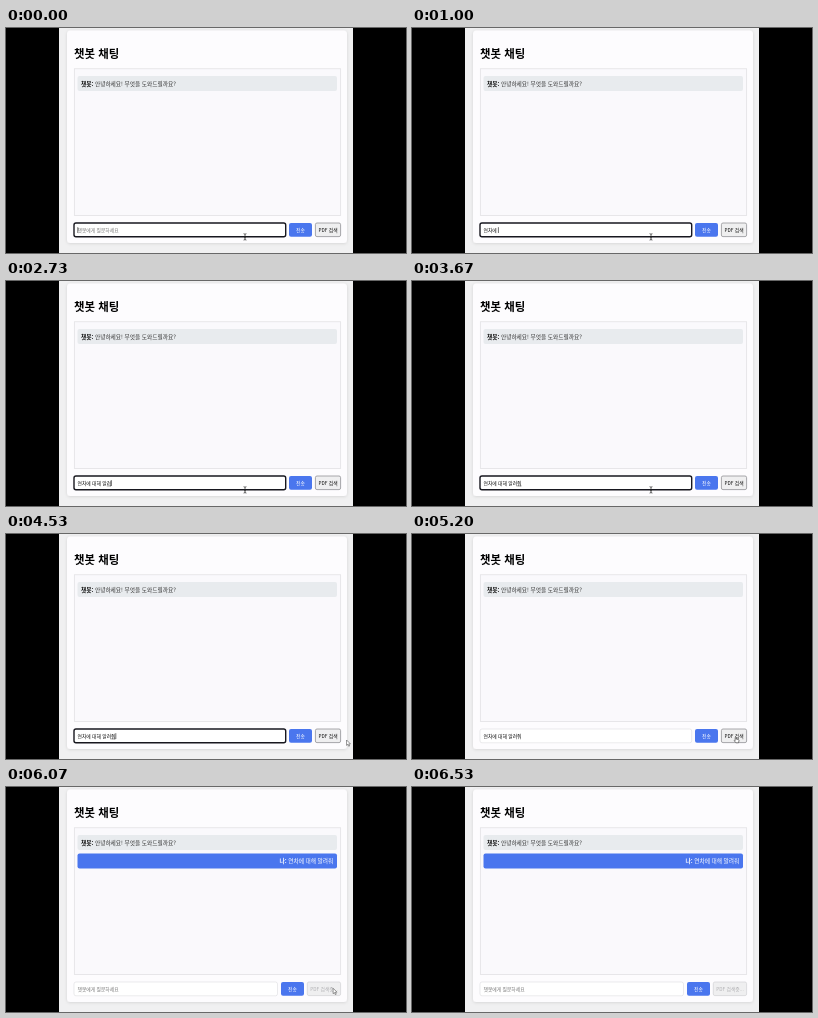
Animation of 400x225 px, one loop 8 s. Source, as an HTML page:

```html
<!DOCTYPE html>
<html lang="ko">
<head>
<meta charset="utf-8">
<style>
html, body { margin: 0; height: 100%; overflow: hidden; background: #000; }
svg { display: block; width: 100vw; height: 100vh; }
text { font: 4.8px "Noto Sans CJK KR", "Noto Sans CJK JP", "Noto Sans CJK", sans-serif; white-space: pre; }
.msg { font-size: 5.7px; }
.bold { font-weight: 700; }
</style>
</head>
<body>
<svg viewBox="0 0 400 225">
  <defs>
    <clipPath id="page"><path d="M53 0H347V225H53Z"/></clipPath>
    <filter id="shadow"><feDropShadow dx="0" dy=".6" stdDeviation="1.5" flood-opacity=".13"/></filter>
  </defs>
  <g clip-path="url(#page)">
    <path d="M53 0H347V225H53Z" fill="#f0f0f1"/>
    <rect x="61" y="2.5" width="280" height="212.5" rx="3.5" fill="#fdfcfe" filter="url(#shadow)"/>
    <text x="68" y="30" class="bold" style="font-size:11.4px">챗봇 채팅</text>
    <rect x="68.3" y="40.8" width="266.4" height="146.7" fill="#faf9fc" stroke="#dedee1" stroke-width=".7"/>
    <rect x="71.5" y="48" width="259.5" height="15" rx="2" fill="#e8ebee"/>
    <text x="75" y="57.7" class="msg" fill="#333"><tspan class="bold" fill="#111">챗봇:</tspan> 안녕하세요! 무엇을 도와드릴까요?</text>
    <g id="reply">
      <rect x="71.5" y="66.5" width="259.5" height="15" rx="2" fill="#4a76ee"/>
      <text x="327.3" y="76.2" class="msg" fill="#fff" text-anchor="end"><tspan class="bold">나:</tspan> 연차에 대해 알려줘</text>
    </g>

    <rect id="box" y="195" height="13.8" rx="2" fill="#fff"/>
    <text id="input" x="71.5" y="203.7"></text>
    <path id="under" stroke="#222" stroke-width=".5"/>
    <path id="caret" stroke="#111" stroke-width=".6"/>

    <g id="send">
      <rect x="283" y="195" width="23" height="13.8" rx="2" fill="#4a76ee"/>
      <text x="294.5" y="203.7" fill="#fff" text-anchor="middle">전송</text>
    </g>
    <rect id="btn" y="195" height="13.6" rx="1.6" fill="#efeff0" stroke-width=".7"/>
    <text id="label" y="203.8" text-anchor="middle"></text>

    <g id="mouse" stroke-linejoin="round">
      <path id="beam" d="M-1.4 -2.8Q0 -2.8 0 -2Q0 -2.8 1.4 -2.8M0 -2V3M-1.4 3.6Q0 3.6 0 2.8Q0 3.6 1.4 3.6M-.8 1.2H.8" fill="none" stroke="#222" stroke-width=".7"/>
      <path id="arrow" d="M0 0V5.4L1.3 4.3L2.2 6.3L3.1 5.9L2.2 3.9H3.9Z" fill="#fff" stroke="#555" stroke-width=".6"/>
      <path id="hand" d="M.7 .5Q1.2 -.3 1.7 .5V2.3L4.2 2.9Q4.6 3.1 4.5 3.8L4 6H1.4L-.3 3.9Q-.2 3.2 .7 3.8Z" fill="#fff" stroke="#333" stroke-width=".6"/>
    </g>
  </g>
</svg>
<script>
const LOOP = 8000, FRAME = 1000 / 15;
const $ = id => document.getElementById(id);
const set = (id, attrs) => { for (const k in attrs) $(id).setAttribute(k, attrs[k]); };
const show = (id, on) => set(id, { visibility: on ? "visible" : "hidden" });
const write = (id, s) => { if ($(id).textContent !== s) $(id).textContent = s; };

// Syllables as the Korean input method composes them
const typing = [
  [0, ""], [70, "ㅇ"], [200, "연"], [400, "연ㅊ"], [470, "연차"],
  [670, "연창"], [870, "연차에"], [1000, "연차에 "],
  [1470, "연차에 ㄷ"], [1600, "연차에 대"], [1870, "연차에 댛"],
  [1930, "연차에 대해"], [2070, "연차에 대해 "],
  [2400, "연차에 대해 ㅇ"], [2470, "연차에 대해 아"], [2530, "연차에 대해 알"],
  [2670, "연차에 대해 알ㄹ"], [2730, "연차에 대해 알려"],
  [3000, "연차에 대해 알렺"], [3130, "연차에 대해 알려줘"]
];
const path = [
  [4130, 239, 208.5], [4330, 290, 212], [4460, 333, 209], [4530, 340.5, 206],
  [4670, 342, 206], [4870, 330, 204], [5000, 322.5, 202.8],
  [5930, 322.5, 202.8], [6270, 334, 199], [6530, 349, 191]
];

function mouseAt(t) {
  if (t <= path[0][0]) return path[0].slice(1);
  const i = path.findIndex(p => p[0] > t);
  if (i < 0) return [400, 191];
  const [t0, x0, y0] = path[i - 1], [t1, x1, y1] = path[i];
  const k = (t - t0) / (t1 - t0);
  return [x0 + (x1 - x0) * k, y0 + (y1 - y0) * k];
}

function draw(t) {
  const sent = t >= 5265, focus = t < 5065;
  const typed = sent ? "" : typing.findLast(s => s[0] <= t)[1];

  write("input", typed || "챗봇에게 질문하세요");
  set("input", { fill: typed ? "#111" : "#777" });
  set("box", {
    x: 68, width: sent ? 203.5 : 211.7,
    stroke: focus ? "#17171f" : "#dcdce0", "stroke-width": focus ? 1.4 : .6
  });

  const end = typed ? 71.5 + $("input").getComputedTextLength() : 71.5;
  const blinkOff = t >= 3665 && t < 4200 || t >= 4730;
  set("caret", { d: `M${end + .3} 199.2V205` });
  show("caret", focus && !blinkOff);
  set("under", { d: `M${end - 4.3} 204.9H${end}` });
  show("under", focus && typed && !typed.endsWith(" "));

  show("reply", sent);
  set("send", { transform: `translate(${sent ? -8 : 0})` });
  set("btn", {
    x: sent ? 301.3 : 309.4, width: sent ? 33.3 : 25.2,
    stroke: sent ? "#d2d2d4" : "#858589"
  });
  write("label", sent ? "PDF 검색중..." : "PDF 검색");
  set("label", { x: sent ? 318 : 322, fill: sent ? "#b0b0b3" : "#111" });

  const [x, y] = mouseAt(Math.floor(t / FRAME + .1) * FRAME);
  const beam = x < 280 && y < 209.5;
  const hand = !sent && x > 309 && x < 335 && y < 209;
  set("mouse", { transform: `translate(${x} ${y})` });
  show("beam", beam);
  show("hand", hand);
  show("arrow", !beam && !hand);
}

const start = performance.now();
function tick() {
  draw((performance.now() - start) % LOOP);
  requestAnimationFrame(tick);
}
tick();
</script>
</body>
</html>
```
